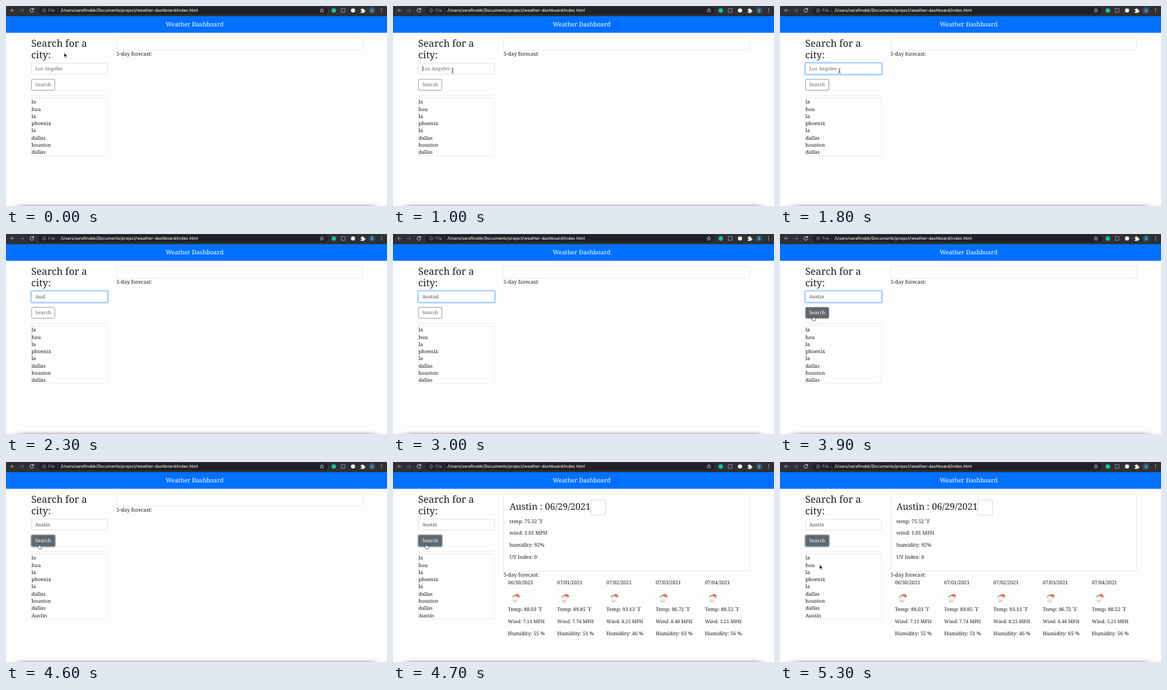
Animation, 600 px wide and 314 px high, one loop 5.4 s. Source, as an HTML page:

```html
<!DOCTYPE html>
<html lang="en">
<head>
<meta charset="utf-8">
<title>Weather Dashboard</title>
<style>
html, body { margin: 0; width: 100%; height: 100%; overflow: hidden; background: #fdfdfd; }
svg { display: block; width: 100%; height: 100%; }
text { font: 7.9px "Noto Serif", serif; fill: #1b1e21; white-space: pre; text-rendering: geometricPrecision; }
.ui { font-family: Inter, Roboto, sans-serif; }
.box { fill: #fdfdfd; stroke: #dfdfdf; stroke-width: .6; }
.line { fill: none; stroke-linecap: round; stroke-linejoin: round; }
</style>
</head>
<body>
<svg id="stage" viewBox="0 0 600 314">
  <defs>
    <filter id="soft" x="-10%" y="-200%" width="120%" height="500%"><feGaussianBlur stdDeviation="7 2.6"/></filter>
    <g id="rain">
      <circle cx="14.6" cy="10.2" r="3.7" fill="#ec6e4c"/>
      <path d="M8 15.6a2.2 2.2 0 0 1 .3-4.3a3.1 3.1 0 0 1 5.8-.3a2.4 2.4 0 0 1 1.6 4.6z" fill="#f1f1f1"/>
      <path d="M7.2 11.3a2.6 2.6 0 0 1 4.2-1.9" class="line" stroke="#55565a" stroke-width="1"/>
      <path d="M8.6 16.4l-.5 1M11.3 16.4l-.7 1.8M14 16.4l-.5 1M9.7 18.6l-.4.9M13 18.3l-.4.9" class="line" stroke="#77797d" stroke-width=".7"/>
    </g>
  </defs>

  <rect width="600" height="16" fill="#2f3033"/>
  <rect x="51" y="1.2" width="456" height="11.8" rx="5.9" fill="#1f2023"/>
  <g class="line" stroke-width=".9">
    <path d="M13 7H7.4M9.8 4.4L7.2 7l2.6 2.6" stroke="#a4a6a9"/>
    <path d="M22.2 7h5.6M25.4 4.4L28 7l-2.6 2.6" stroke="#6b6d70"/>
    <path d="M43 5a2.9 2.9 0 1 0 .6 2.6M43.4 3.6V5.5h-1.9" stroke="#e4e5e7"/>
    <circle cx="60" cy="7" r="2.6" stroke="#a4a6a9" stroke-width=".6"/>
    <path d="M60 6.8v1.5M60 5.6v.05" stroke="#a4a6a9" stroke-width=".6"/>
    <path d="M81.4 3.8v6.6" stroke="#606265" stroke-width=".5"/>
    <path id="star" stroke="#d5d6d8" stroke-width=".7"/>
    <rect x="528.5" y="4.1" width="5.4" height="5.8" stroke="#b5b7ba" stroke-width=".7"/>
  </g>
  <text class="ui" x="66.6" y="9.4" style="font-size:6.4px;fill:#a4a6a9">File</text>
  <text class="ui" x="85.7" y="9.4" style="font-size:6.5px;font-weight:500;fill:#f1f1f2">/Users/serafinobk/Documents/project/weather-dashboard/index.html</text>
  <circle cx="516.2" cy="7" r="3.5" fill="#15c39a"/>
  <circle cx="546.5" cy="7" r="3.3" fill="#f1f1f1"/>
  <path d="M558.5 5h1.7a1.2 1.2 0 1 1 2.3 0h1.8v1.9a1.2 1.2 0 1 1 0 2.2v1.6h-5.8V8.9a1.1 1.1 0 1 0 0-2z" fill="#eceded"/>
  <circle cx="576.5" cy="7" r="5" fill="#285a70"/>
  <text class="ui" x="576.5" y="9.1" text-anchor="middle" style="font-size:5.6px;fill:#eceded">S</text>
  <g fill="#dcdddf"><circle cx="591.5" cy="4.4" r=".7"/><circle cx="591.5" cy="7" r=".7"/><circle cx="591.5" cy="9.6" r=".7"/></g>

  <rect y="16" width="600" height="26" fill="#0071ff"/>
  <text x="297" y="32.1" text-anchor="middle" style="font-size:9.55px;fill:#fff">Weather Dashboard</text>

  <text x="39.8" y="64" style="font-size:15.3px">Search for a</text>
  <text x="39.8" y="82" style="font-size:15.3px">city:</text>

  <rect id="glow" x="39" y="88.7" width="122" height="19.3" rx="2.6" fill="none" stroke="#007bff" stroke-opacity=".3" stroke-width="2"/>
  <rect id="field" x="40.2" y="89.8" width="119.6" height="17.2" rx="1.6" fill="#fff" stroke-width=".7"/>
  <text id="entry" x="46" y="101.4" style="font-size:7.7px"></text>
  <rect id="caret" y="94" width=".6" height="8.4" fill="#444"/>

  <rect id="halo" x="39.3" y="114.2" width="38.4" height="19" rx="2.6" fill="none" stroke="#6c757d" stroke-opacity=".5" stroke-width="1.6"/>
  <rect id="button" x="40.2" y="115.1" width="36.7" height="17.2" rx="1.8" stroke="#6c757d" stroke-width=".7"/>
  <text id="label" x="58.6" y="126.2" text-anchor="middle" style="font-size:7.75px">Search</text>

  <path d="M40 140.3H160" stroke="#e2e2e2" stroke-width=".6"/>
  <rect id="listBox" class="box" x="40.2" y="144.3" width="119.6" rx="1.8"/>
  <g id="list"></g>

  <rect id="card" class="box" x="174.3" y="50.2" width="387.6" rx="1.8"/>
  <g id="today">
    <text x="183.5" y="75.3" style="font-size:14.3px">Austin : 06/29/2021</text>
    <rect x="311.4" y="59.7" width="23.3" height="23.3" fill="none" stroke="#c4c4c4" stroke-width=".6"/>
  </g>
  <text id="outlook" x="174" style="font-size:8.1px">5-day forecast:</text>
  <g id="days"></g>

  <rect x="20" y="313.4" width="560" height="9" fill="#444" opacity=".6" filter="url(#soft)"/>

  <g id="arrow"><path d="M0 0V7.2L1.7 5.7 2.8 8.2 4 7.7 2.9 5.2H5.1Z" fill="#111" stroke="#fff" stroke-width=".5"/></g>
  <g id="beam"><path d="M-1.6-3.7Q0-3.7 0-2.6V2.6Q0 3.7-1.6 3.7M1.6-3.7Q0-3.7 0-2.6M0 2.6Q0 3.7 1.6 3.7M-.8.9H.8" class="line" stroke="#222" stroke-width=".65"/></g>
  <g id="hand"><path d="M-1.5-3.4a.7.7 0 0 1 1.4 0V-.9l3 .7q.7.3.6 1L2.9 4H-.7L-3.1.9q-.3-.9.7-.8l.9.7Z" fill="#fff" stroke="#111" stroke-width=".6"/></g>
</svg>
<script>
const LOOP = 5400, STEP = 100;
const $ = id => document.getElementById(id);
const set = (id, attrs) => { for (const k in attrs) $(id).setAttribute(k, attrs[k]); };
const show = (id, on) => set(id, { visibility: on ? 'visible' : 'hidden' });
const ramp = (t, from, to) => Math.min(1, Math.max(0, (t - from) / (to - from)));
const mix = (a, b, k) => `rgb(${a.map((v, i) => Math.round(v + (b[i] - v) * k))})`;
const text = (x, y, s) => `<text x="${x}" y="${y}">${s}</text>`;

const GREY = [98, 107, 115], WHITE = [255, 255, 255], DARK = [95, 105, 112];
const BORDER = [206, 212, 218], FOCUS = [128, 189, 255];

const cities = ['la', 'hou', 'la', 'phoenix', 'la', 'dallas', 'houston', 'dallas', 'Austin'];
const now = ['temp: 75.52 ˚F', 'wind: 1.01 MPH', 'humidity: 92%', 'UV Index: 0'];
const days = [
  ['06/30/2021', '88.03', '7.11', 55],
  ['07/01/2021', '89.85', '7.74', 51],
  ['07/02/2021', '93.13', '8.25', 46],
  ['07/03/2021', '86.72', '8.48', 65],
  ['07/04/2021', '88.52', '5.21', 56]
];

$('list').innerHTML = cities.map((c, i) => text(40.2, 153.3 + i * 11.28, c)).join('');
$('today').innerHTML += now.map((s, i) => text(183.5, 95.6 + i * 18.7, s)).join('');
$('days').innerHTML = days.map(([date, temp, wind, hum], i) => {
  const x = 181 + i * 77.55;
  return text(x, 191.8, date) + `<use href="#rain" x="${x}" y="200.8"/>` +
    text(x, 233.8, `Temp: ${temp} ˚F`) +
    `<text x="${x}" y="252.7" style="font-size:7.5px">Wind: ${wind} MPH</text>` +
    text(x, 271.5, `Humidity: ${hum} %`);
}).join('');

set('star', { d: 'M' + Array.from({ length: 10 }, (_, i) => {
  const r = i % 2 ? 1.5 : 3.3, a = Math.PI * (i / 5 - .5);
  return `${(497.5 + r * Math.cos(a)).toFixed(2)} ${(7.2 + r * Math.sin(a)).toFixed(2)}`;
}).join('L') + 'Z' });

// time, x, y, pointer shape from that time on
const path = [
  [0, 91.5, 73.4, 'arrow'], [200, 92.3, 77.8, 'arrow'], [300, 92.3, 77.8, 'arrow'],
  [400, 92.8, 90, 'beam'], [500, 93.7, 101.6, 'beam'], [2000, 93.7, 101.6, ''],
  [3200, 92, 104, 'beam'], [3300, 82, 111, 'arrow'], [3500, 57, 129, 'hand'],
  [3700, 52.6, 132.3, 'hand'], [5100, 52.6, 132.3, 'hand'], [5200, 58, 147, 'arrow'],
  [5300, 62.3, 161, 'arrow'], [LOOP, 62.3, 161, 'arrow']
];
const keys = [[2000, 'A'], [2100, 'Au'], [2300, 'Aus'], [2500, 'Aust'], [2800, 'Austi'], [2900, 'Austin']];

function pointer(t) {
  const i = path.findIndex((p, n) => t >= p[0] && t < path[n + 1][0]);
  const [t0, x0, y0, kind] = path[i], [t1, x1, y1] = path[i + 1];
  const k = ramp(t, t0, t1);
  for (const id of ['arrow', 'beam', 'hand']) show(id, id === kind);
  if (kind) set(kind, { transform: `translate(${x0 + (x1 - x0) * k} ${y0 + (y1 - y0) * k})` });
}

function field(t) {
  const typed = keys.filter(k => t >= k[0]).pop();
  const entry = $('entry');
  entry.textContent = typed ? typed[1] : 'Los Angeles';
  entry.style.fill = typed ? '#495057' : mix(GREY, WHITE, 0);
  const focus = ramp(t, 1000, 1200) * (1 - ramp(t, 4000, 4200));
  set('glow', { opacity: focus });
  set('field', { stroke: mix(BORDER, FOCUS, focus) });
  set('caret', { x: typed ? 46.3 + entry.getComputedTextLength() : 46.2 });
  show('caret', t >= 1000 && t < 1500 || t >= 2000 && t < 3500);
}

function draw(t) {
  field(t);
  const hover = ramp(t, 3400, 3600), done = t >= 4200, loaded = t >= 4700;
  set('button', { fill: mix(WHITE, DARK, hover) });
  $('label').style.fill = mix(GREY, WHITE, hover);
  set('halo', { opacity: ramp(t, 4000, 4200) });
  set('listBox', { height: done ? 102.3 : 91 });
  $('list').lastChild.setAttribute('visibility', done ? 'visible' : 'hidden');
  set('card', { height: loaded ? 121.3 : 19.2 });
  set('outlook', { y: loaded ? 180.4 : 78.1 });
  show('today', loaded);
  show('days', loaded);
  pointer(t);
}

const start = performance.now();
function tick() {
  const t = (performance.now() - start) % LOOP;
  draw(Math.floor(t / STEP) * STEP);
  requestAnimationFrame(tick);
}
tick();
</script>
</body>
</html>
```
